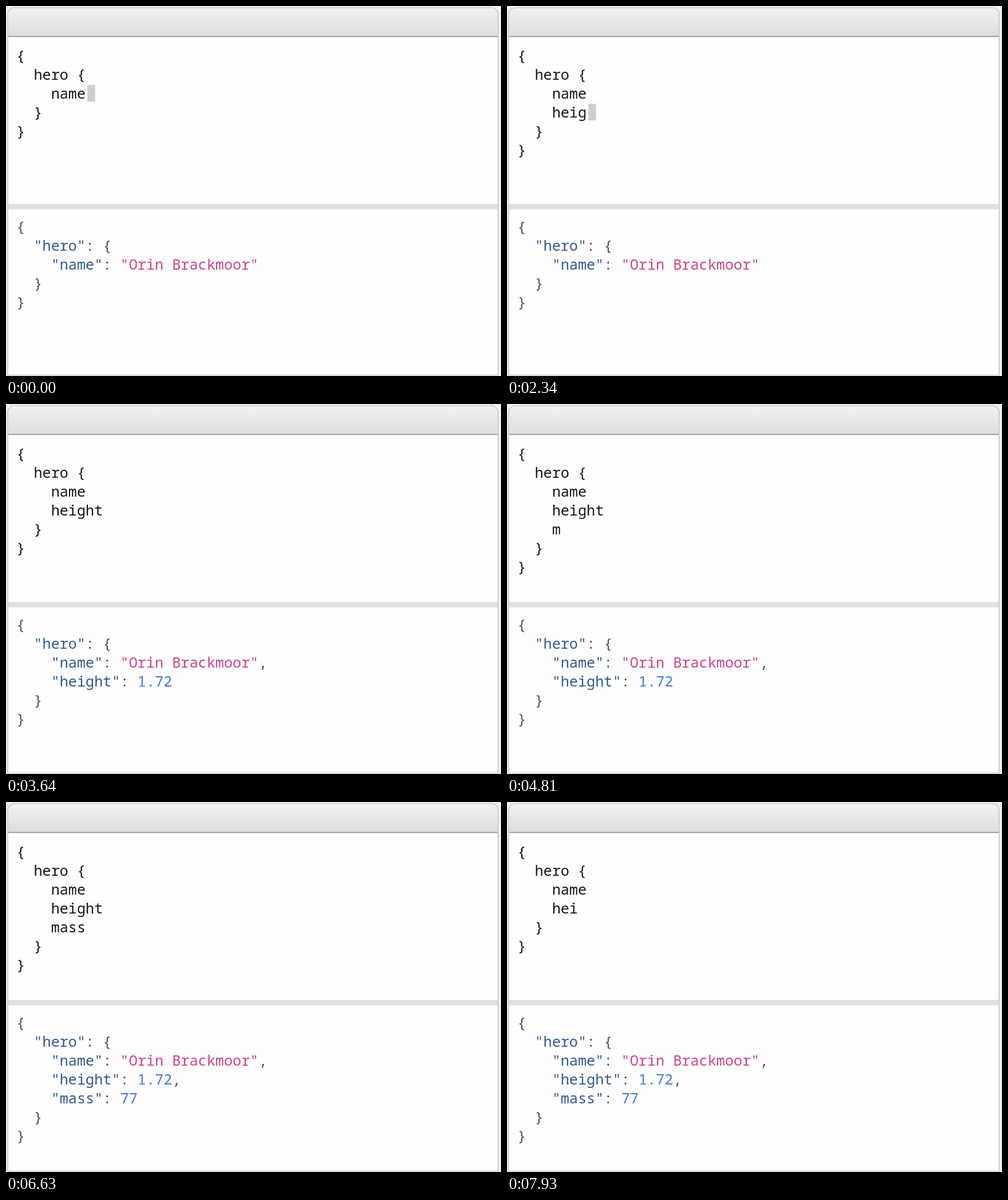
An HTML page for the animation above (8 s loop, 865 by 647 pixels).

```html
<!DOCTYPE html>
<html lang="en">
<head>
<meta charset="utf-8">
<title>Query editor</title>
<style>
  html, body { margin: 0; width: 100%; height: 100%; overflow: hidden; background: #f0f0f0; }
  svg { display: block; width: 865px; height: 647px; }
  text { font: 400 25.2px "Noto Sans Mono", "Liberation Mono", monospace; white-space: pre; }
  .query { fill: #15151b; }
  .punct { fill: #505058; }
  .key { fill: #33598f; }
  .string { fill: #cb4587; }
  .number { fill: #4079d9; }
</style>
</head>
<body>
<svg viewBox="0 0 865 647" xml:space="preserve">
  <defs>
    <linearGradient id="bar" x1="0" y1="0" x2="0" y2="1">
      <stop offset="0" stop-color="#f2f2f2"/>
      <stop offset="1" stop-color="#dddddd"/>
    </linearGradient>
    <clipPath id="frame"><path d="M3 646V15a12 12 0 0 1 12-12H848a12 12 0 0 1 12 12V646Z"/></clipPath>
  </defs>
  <g clip-path="url(#frame)">
    <rect x="3" y="3" width="857" height="643" fill="#fefefe"/>
    <rect x="3" y="3" width="857" height="50" fill="url(#bar)"/>
    <rect x="3" y="52.5" width="857" height="1.7" fill="#93938f"/>
    <rect x="3" y="346" width="857" height="9.5" fill="#e0e0e0"/>
  </g>
  <path d="M3 645.5V15a12 12 0 0 1 12-12H848a12 12 0 0 1 12 12V645.5Z" fill="none" stroke="#c9c9c9" stroke-width="1.7"/>
  <rect id="caret" width="13.5" height="29" fill="#cecece"/>
  <g id="query"></g>
  <g id="result"></g>
</svg>
<script>
const LOOP = 8000, LEFT = 18.2, ADVANCE = 15.12, LINE = 33;
const QUERY_Y = 95.5, RESULT_Y = 394.5;
const BLINK = 520, FIRST_BLINK = 390;

const IN = "\n    ";
const H = "name" + IN + "height";

// [time, text typed inside the hero block]
const typing = [
  [0, "name"],
  [1300, "name" + IN],
  [1820, "name" + IN + "h"],
  [2080, "name" + IN + "he"],
  [2210, "name" + IN + "hei"],
  [2340, "name" + IN + "heig"],
  [2470, "name" + IN + "heigh"],
  [2600, H],
  [4290, H + IN],
  [4680, H + IN + "m"],
  [5070, H + IN + "ma"],
  [5200, H + IN + "mas"],
  [5460, H + IN + "mass"],
  [7020, H + IN + "mas"],
  [7150, H + IN + "m"],
  [7280, H + IN],
  [7410, H + "\n  "],
  [7540, H],
  [7670, "name" + IN + "heigh"],
  [7800, "name" + IN + "heig"],
  [7930, "name" + IN + "hei"]
];

const name = "Orin Brackmoor";
const replies = [
  [0, { name }],
  [2730, { name, height: 1.72 }],
  [5590, { name, height: 1.72, mass: 77 }]
];

const byId = id => document.getElementById(id);
const caret = byId("caret"), query = byId("query"), result = byId("result");

function make(tag, attrs, content) {
  const el = document.createElementNS("http://www.w3.org/2000/svg", tag);
  for (const key in attrs) el.setAttribute(key, attrs[key]);
  if (content) el.textContent = content;
  return el;
}

function tokenType(token) {
  if (token.endsWith('":')) return "key";
  if (token[0] === '"') return "string";
  return /^\d/.test(token) ? "number" : "punct";
}

function tokens(line) {
  const out = [];
  for (const [part] of line.matchAll(/"[^"]*":?|\d+(?:\.\d+)?|[^"\d]+/g)) {
    const type = tokenType(part);
    if (type === "key") out.push([type, part.slice(0, -1)], ["punct", ":"]);
    else out.push([type, part]);
  }
  return out;
}

function drawLines(group, source, top, split) {
  group.replaceChildren(...source.split("\n").map((line, row) => {
    const text = make("text", { x: LEFT, y: top + row * LINE });
    for (const [type, part] of split(line)) text.append(make("tspan", { class: type }, part));
    return text;
  }));
}

function drawQuery(typed) {
  drawLines(query, "{\n  hero {\n    " + typed + "\n  }\n}", QUERY_Y, line => [["query", line]]);
  const rows = ("    " + typed).split("\n");
  caret.setAttribute("x", LEFT + rows.at(-1).length * ADVANCE + 3);
  caret.setAttribute("y", 138 + (rows.length - 1) * LINE);
}

function drawResult(hero) {
  drawLines(result, JSON.stringify({ hero }, null, 2), RESULT_Y, tokens);
}

const current = (steps, t) => steps.findLast(step => step[0] <= t);

let shownQuery, shownReply;
function render(t) {
  const typed = current(typing, t), reply = current(replies, t);
  if (typed !== shownQuery) drawQuery((shownQuery = typed)[1]);
  if (reply !== shownReply) drawResult((shownReply = reply)[1]);
  const off = Math.floor((t - FIRST_BLINK) / BLINK) % 2 === 0;
  caret.setAttribute("visibility", off ? "hidden" : "visible");
}

const start = performance.now();
function tick(now) {
  render(Math.max(0, now - start) % LOOP);
  requestAnimationFrame(tick);
}
render(0);
requestAnimationFrame(tick);
</script>
</body>
</html>
```
